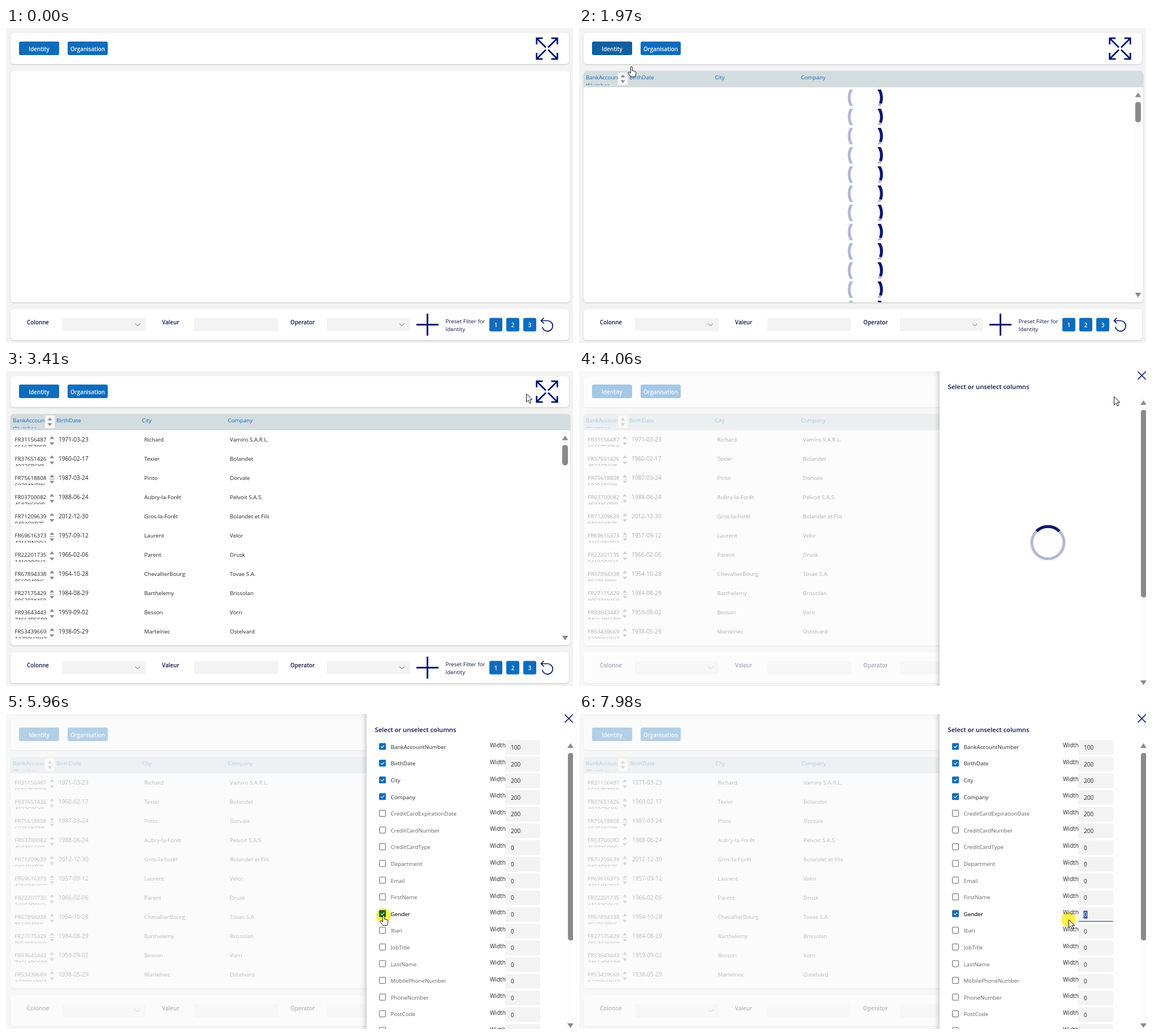
These frames come from a looping animation (1003 px wide and 558 px high, 8 s). An HTML page:

```html
<!DOCTYPE html>
<html lang="en">
<head>
<meta charset="utf-8">
<title>Column picker</title>
<style>
  html, body { margin: 0; width: 100%; height: 100%; overflow: hidden; background: #f3f3f3; }
  svg { display: block; width: 100vw; height: 100vh; font: 9.8px "Open Sans", "Noto Sans", sans-serif; }
  text { fill: #242424; white-space: pre; }
  .ink { fill: #0b1445; }
  .bold { font-weight: 600; }
  .on { fill: #fff; font-weight: 600; text-anchor: middle; }
  .head { fill: #0f6cbd; }
  .date { font-size: 10.1px; }
  .off { fill: #616161; }
  .btn { fill: #0f6cbd; }
  .card { fill: #fff; filter: drop-shadow(0 1px 1.2px rgba(0, 0, 0, .2)); }
  .field { fill: #f3f3f3; }
  .grey { fill: #8a8a8a; }
  .track { fill: #fcfcfc; }
  .icon { fill: none; stroke: #00126b; }
  .chevron { fill: none; stroke: #616161; }
  .ring { fill: none; stroke: #00126b; stroke-width: 5; }

  /* One loop is 8 s, so 1% is 80 ms. */
  .tl { animation: 8s step-end infinite; }
  #table { animation-name: table; }
  #waiting { animation-name: waiting; }
  #rows { animation-name: rows; }
  .cols { animation-name: cols; }
  #identity { animation-name: identity; }
  #expand { animation-name: expand; }
  #overlay { animation-name: overlay; }
  #panel { animation-name: panel; filter: drop-shadow(-2px 0 5px rgba(0, 0, 0, .22)); }
  #loading { animation-name: loading; }
  #list { animation-name: list; }
  #picked { animation-name: picked; }
  #focus { animation-name: focus; }
  #marked { animation-name: marked; }
  #press { animation-name: press; mix-blend-mode: multiply; }
  #arrow { animation-name: arrow; }
  #hand { animation-name: hand; }
  #beam { animation-name: beam; }
  #cursor { animation: path 8s linear infinite; }
  .arc { animation: spin 1.6s linear infinite; }

  @keyframes spin {
    from { transform: rotate(var(--from)); }
    to { transform: rotate(calc(var(--from) + 360deg)); }
  }
  @keyframes table { 0% { opacity: 0; } 22% { opacity: 1; } }
  @keyframes waiting { 0% { opacity: 1; } 28.25% { opacity: 0; } }
  @keyframes rows { 0% { opacity: 0; } 28.25% { opacity: 1; } }
  @keyframes cols { 0% { transform: none; } 76% { transform: translateX(1px); } }
  @keyframes identity { 0% { fill: #0f6cbd; } 14.75% { fill: #115ea3; } 25.25% { fill: #0f6cbd; } }
  @keyframes expand { 0% { opacity: 1; } 43.5% { opacity: .85; } 49.75% { opacity: 1; } }
  @keyframes overlay { 0% { opacity: 0; } 49.75% { opacity: .64; } 52.5% { opacity: .7; } }
  @keyframes panel { 0% { opacity: 0; } 49.75% { opacity: 1; } }
  @keyframes loading { 0% { opacity: 1; } 53% { opacity: 0; } }
  @keyframes list { 0% { opacity: 0; } 53% { opacity: 1; } }
  @keyframes picked { 0% { opacity: 0; } 74% { opacity: 1; } }
  @keyframes focus { 0% { opacity: 0; } 97.25% { opacity: 1; } }
  @keyframes marked { 0% { opacity: 0; } 98.25% { opacity: 1; } }
  @keyframes press {
    0% { opacity: 0; }
    19.5% { opacity: 1; } 21% { opacity: 0; }
    47.75% { opacity: 1; } 49.25% { opacity: 0; }
    73.5% { opacity: 1; } 75% { opacity: 0; }
    97.125% { opacity: 1; }
  }
  @keyframes arrow {
    0% { opacity: 0; } 1.875% { opacity: 1; } 2.875% { opacity: 0; }
    7.625% { opacity: 1; } 14.5% { opacity: 0; }
    25.25% { opacity: 1; } 43.5% { opacity: 0; }
    49.75% { opacity: 1; } 70.5% { opacity: 0; }
    75.5% { opacity: 1; } 85.75% { opacity: 0; }
    99.125% { opacity: 1; }
  }
  @keyframes hand {
    0% { opacity: 0; } 14.5% { opacity: 1; } 25.25% { opacity: 0; }
    43.5% { opacity: 1; } 49.75% { opacity: 0; }
    70.5% { opacity: 1; } 75.5% { opacity: 0; }
  }
  @keyframes beam { 0% { opacity: 0; } 85.75% { opacity: 1; } 99.125% { opacity: 0; } }
  @keyframes path {
    0%, 1.875% { transform: translate(883px, 388px); }
    2.375%, 2.875% { transform: translate(740px, 144px); }
    2.88%, 7.625% { transform: translate(169px, 6px); }
    8% { transform: translate(163px, 12px); }
    11.625% { transform: translate(163px, 12px); animation-timing-function: ease-in; }
    14.25% { transform: translate(104px, 33px); animation-timing-function: ease-out; }
    17.375%, 22% { transform: translate(72px, 43px); }
    24.5% { transform: translate(93px, 69px); }
    24.75% { transform: translate(93px, 69px); animation-timing-function: ease-out; }
    29.25% { transform: translate(200px, 157px); }
    31.375% { transform: translate(200px, 157px); animation-timing-function: ease-in-out; }
    41%, 42.75% { transform: translate(920px, 40px); }
    44.625%, 56.875% { transform: translate(946px, 45px); animation-timing-function: ease-in-out; }
    64%, 66.125% { transform: translate(642px, 319px); }
    69% { transform: translate(708px, 340px); animation-timing-function: ease-out; }
    71.375% { transform: translate(668px, 357px); }
    75% { transform: translate(668px, 357px); animation-timing-function: ease-in; }
    79% { transform: translate(790px, 520px); animation-timing-function: ease-out; }
    83.125%, 83.75% { transform: translate(881px, 447px); }
    86.125%, 88.125% { transform: translate(904px, 374px); }
    88.75%, 91.5% { transform: translate(912px, 380px); }
    91.875%, 93.9% { transform: translate(912px, 358px); }
    94%, 97.5% { transform: translate(906px, 358px); }
    99.6%, 100% { transform: translate(866px, 364px); }
  }
</style>
</head>
<body>
<svg viewBox="0 0 1003 558">
  <defs>
    <clipPath id="tableClip"><rect x="8" y="76" width="990" height="410" rx="6"/></clipPath>
    <clipPath id="ringClip"><rect x="-40" y="-14.5" width="80" height="29"/></clipPath>
    <clipPath id="headClip"><rect x="8" y="76" width="61" height="25"/></clipPath>
    <clipPath id="cellClip"><rect y="-16" width="64" height="26"/></clipPath>
  </defs>

  <rect width="1003" height="558" fill="#f3f3f3"/>
  <rect class="card" x="8" y="9" width="988" height="55" rx="6"/>
  <rect class="card" x="8" y="76" width="990" height="410" rx="6"/>
  <rect class="card" x="8" y="498" width="988" height="55" rx="6"/>

  <rect id="identity" class="btn tl" x="23" y="24" width="71" height="24" rx="3"/>
  <rect class="btn" x="109" y="24" width="71" height="24" rx="3"/>
  <text class="on" x="58.5" y="40.5">Identity</text>
  <text class="on" x="144.5" y="40.5">Organisation</text>

  <g id="expand" class="icon tl" stroke-width="2.7"></g>

  <g clip-path="url(#tableClip)">
    <g id="table" class="tl">
      <rect x="8" y="76" width="990" height="29" fill="#d3dcdf"/>
      <g clip-path="url(#headClip)">
        <text class="head" x="12" y="91">BankAccoun</text>
        <text class="head" x="12" y="104.5">tNumber</text>
      </g>
      <rect x="69" y="79" width="17" height="22" fill="#f7f7f7"/>
      <path class="grey" d="M73.5 87.5l4-5 4 5zM73.5 92.5l4 5 4-5z"/>
      <g class="cols tl">
        <text class="head" x="89" y="91">BirthDate</text>
        <text class="head" x="240.5" y="91">City</text>
        <text class="head" x="392.5" y="91">Company</text>
      </g>
      <rect class="track" x="982" y="105" width="16" height="381"/>
      <path class="grey" d="M983.5 122.5l5.5-8 5.5 8zM983.5 469l5.5 8 5.5-8z"/>
      <rect class="grey" x="984" y="131" width="10" height="36" rx="4.5"/>
      <g id="waiting" class="tl"></g>
      <g id="rows" class="tl"></g>
    </g>
  </g>

  <text class="ink bold" x="37" y="525">Colonne</text>
  <text class="ink bold" x="276" y="525">Valeur</text>
  <text class="ink bold" x="503" y="525">Operator</text>
  <rect class="field" x="99" y="514" width="148.500" height="23" rx="3"/>
  <rect class="field" x="333" y="514" width="148.500" height="23" rx="3"/>
  <rect class="field" x="568" y="514" width="147" height="23" rx="3"/>
  <path class="chevron" d="M228.500 523.500l4.300 4.300 4.300-4.300M696 523.500l4.300 4.300 4.300-4.300"/>
  <path class="icon" stroke-width="3" d="M726 525.500h39M745.500 506v39"/>
  <text class="ink" x="777.500" y="522.500">Preset Filter for</text>
  <text class="ink" x="777.500" y="536.500">Identity</text>
  <g id="presets"></g>
  <path class="icon" stroke-width="1.700" d="M951.500 513.500l-5 5 5 5M946.500 518.500H958a9.300 9.300 0 1 1-9.300 10.800"/>

  <rect id="overlay" class="tl" width="1003" height="558" fill="#fafafa"/>

  <g id="panel" class="tl">
    <rect x="638" y="-10" width="380" height="580" fill="#fff"/>
    <text class="ink bold" x="652.500" y="32" font-size="11.2">Select or unselect columns</text>
    <path class="icon" stroke-width="1.700" d="M988.500 1l14 14M1002.500 1l-14 14"/>
    <rect class="track" x="991" y="48" width="12" height="510"/>
    <path class="grey" d="M993 60l5.500-8 5.500 8zM993 548l5.500 8 5.500-8z"/>
    <rect class="grey" x="994" y="69" width="10" height="332" rx="4.500"/>
    <g id="loading" class="tl"></g>
    <g id="list" class="tl"></g>
  </g>

  <g id="cursor">
    <circle id="press" class="tl" r="13" fill="#fff04a"/>
    <path id="arrow" class="tl" fill="#fff" stroke="#111"
      d="M.5.500V15L4 11.800 6.300 17 8.700 16 6.500 10.800H11Z"/>
    <path id="hand" class="tl" fill="#fff" stroke="#111"
      d="M-1.700 11V1a1.500 1.500 0 0 1 3 0V6.500l4.600 1q2.200.6 2 3l-.8 4.500-1 2.500H-1.400l-4.400-6q-1-1.800.6-2.200 1.400-.2 3.500 1.700z"/>
    <path id="beam" class="tl" fill="none" stroke="#111" d="M-2.500-8h5M0-8V8M-2.500 8h5"/>
  </g>
</svg>

<script>
  const fill = (id, parts) => document.getElementById(id).innerHTML = parts.join('');
  const text = (x, y, s, cls = '') => `<text class="${cls}" x="${x}" y="${y}">${s}</text>`;
  const at = (x, y, body) => `<g transform="translate(${x} ${y})">${body}</g>`;
  const ring = from => `<circle class="ring" r="28.5" opacity=".3"/>
    <circle class="ring arc" r="28.5" pathLength="360" stroke-dasharray="90 270" style="--from:${from}deg"/>`;

  fill('expand', [[-1, -1], [1, -1], [1, 1], [-1, 1]].map(([sx, sy]) =>
    `<path transform="translate(957 36.5) scale(${sx} ${sy})" d="M18.300 7.500V18.300H7.500M18.300 18.300L2 2"/>`));

  fill('presets', [1, 2, 3].map((n, i) =>
    `<rect class="btn" x="${855 + 30 * i}" y="513.500" width="23" height="24" rx="3"/>` +
    text(866.5 + 30 * i, 529.5, n, 'on')));

  const people = [
    ['FR31156487', '66167F7059', '1971-03-23', 'Richard', 'Vamiro S.A.R.L.'],
    ['FR37651426', '4022CB6Y8', '1960-02-17', 'Texier', 'Bolandet'],
    ['FR75618808', '6020ANOW', '1987-03-24', 'Pinto', 'Dorvale'],
    ['FR03700082', '4587X6O9P', '1988-06-24', 'Aubry-la-Forêt', 'Pelvoit S.A.S.'],
    ['FR71209639', '0404OXP75', '2012-12-30', 'Gros-la-Forêt', 'Bolandet et Fils'],
    ['FR69616373', '4316DN2O2', '1957-09-12', 'Laurent', 'Velor'],
    ['FR22201735', '14193O9H3', '1966-02-06', 'Parent', 'Drusk'],
    ['FR67894338', '8569048N6', '1954-10-28', 'ChevallierBourg', 'Tovae S.A.'],
    ['FR27175429', '905201Y459', '1984-08-29', 'Barthelemy', 'Brissolan'],
    ['FR93643443', '74664B65B9', '1959-09-02', 'Besson', 'Vorn'],
    ['FR53439669', '12309H2IH7', '1938-05-29', 'Martelnec', 'Ostelvard']
  ];

  fill('rows', people.map(([iban, rest, born, city, firm], i) => at(0, 124.5 + 34 * i,
    `<g clip-path="url(#cellClip)" transform="translate(12 0)">${text(3.5, 0, iban)}${text(3.5, 13.3, rest)}</g>
    <path class="grey" d="M77-4l4.200-5 4.200 5zM77 2l4.200 5 4.200-5z"/>
    ${i % 3 === 2 ? '<path class="grey" d="M77-1.500h8.400v1H77z"/>' : ''}
    <g class="cols tl">${text(93, 0, born, 'date')}${text(244.5, 0, city)}${text(396, 0, firm)}</g>`)));

  fill('waiting', Array.from({ length: 12 }, (_, i) =>
    at(506.5, 123.5 + 34 * i, `<g clip-path="url(#ringClip)">${ring(-153)}</g>`)));

  fill('loading', [at(829.5, 304, ring(31.5))]);

  const box = checked => checked
    ? `<rect class="btn" x="660" y="-6.500" width="12" height="12" rx="1.500"/>
       <path d="M663-.5l2.200 2.200 4-4.200" fill="none" stroke="#fff" stroke-width="1.200"/>`
    : '<rect x="660.500" y="-6" width="11" height="11" rx="1.500" fill="#fff" stroke="#616161"/>';

  const columns = ['BankAccountNumber', 'BirthDate', 'City', 'Company', 'CreditCardExpirationDate',
    'CreditCardNumber', 'CreditCardType', 'Department', 'Email', 'FirstName', 'Gender', 'Iban',
    'JobTitle', 'LastName', 'MobilePhoneNumber', 'PhoneNumber', 'PostCode', 'Region'];

  const gender = name => `<g id="picked" class="tl">${box(true)}${text(680.5, 3.8, name)}</g>
    <path id="focus" class="tl" d="M884 13.300h60.500" stroke="#2b50a0" stroke-width="1.300"/>
    <g id="marked" class="tl"><rect x="892.500" y="-5.500" width="7" height="14" fill="#35559f"/>
      <text x="893" y="5" font-size="10" style="fill:#fff">0</text></g>`;

  fill('list', columns.map((name, i) => at(0, 58 + 29.6 * i,
    `<rect class="field" x="883" y="-12" width="62" height="26" rx="3"/>
    ${box(i < 4)}${text(680.5, 3.8, name, i < 4 ? '' : 'off')}
    ${text(856, 1.3, 'Width', 'date')}${text(893, 5, i === 0 ? 100 : i < 6 ? 200 : 0, 'date')}
    ${name === 'Gender' ? gender(name) : ''}`)));
</script>
</body>
</html>
```
